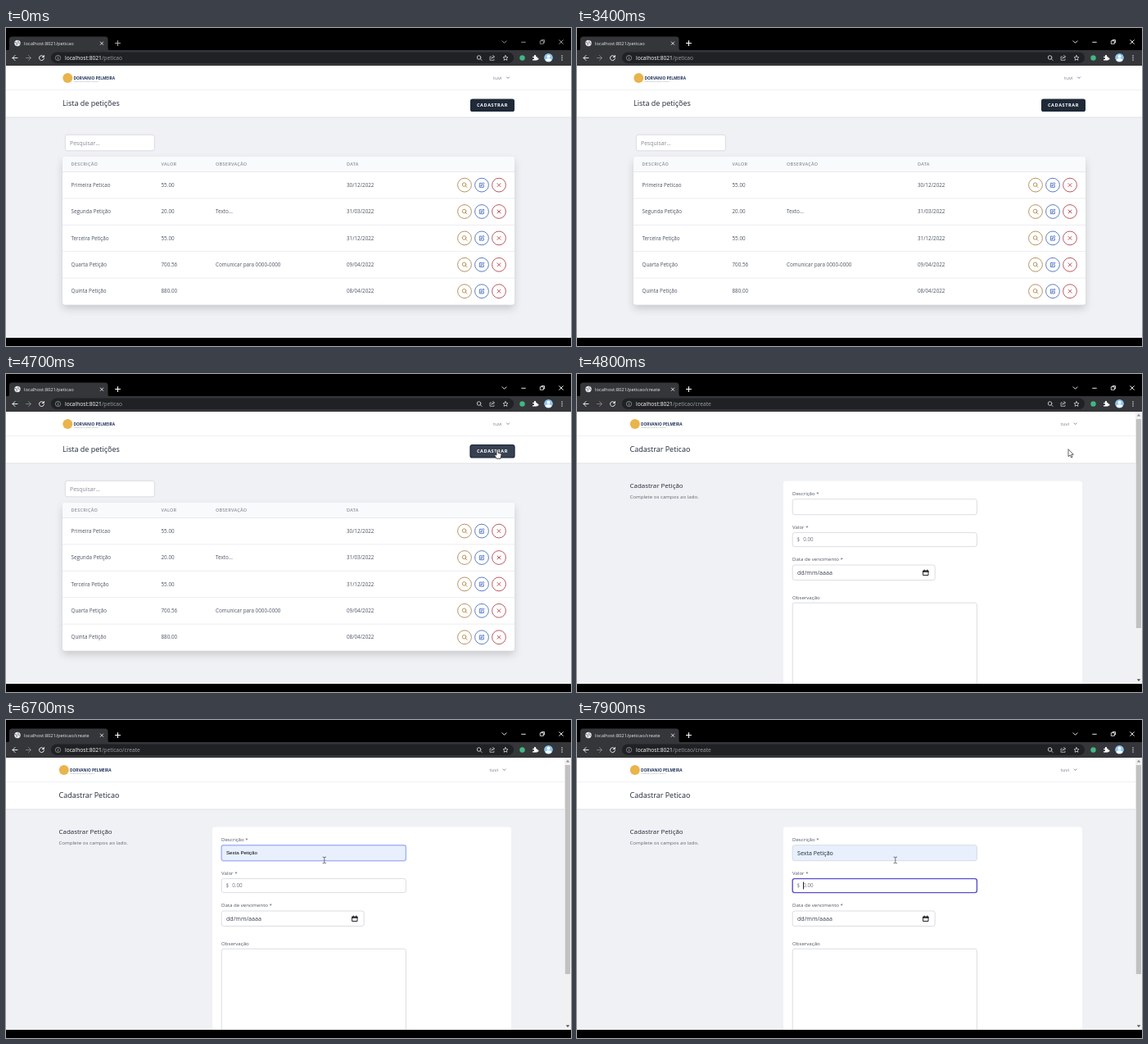
These frames come from a looping animation (690 px wide and 388 px high, 8 s). An HTML page:

```html
<!DOCTYPE html>
<html lang="pt">
<head>
<meta charset="utf-8">
<title>Lista de petições</title>
<style>
html, body { margin: 0; width: 100%; height: 100%; overflow: hidden; background: #000; }
svg { display: block; width: 100%; height: 100%; }
text { font-family: "Open Sans", "Noto Sans", sans-serif; white-space: pre; }
.icon { fill: none; stroke-linecap: round; stroke-linejoin: round; }
</style>
</head>
<body>
<svg id="stage" viewBox="0 0 690 388"></svg>
<script>
const LOOP = 8000, STEP = 100;
const stage = document.getElementById('stage');

// Text is placed by its left edge and the middle of its capitals.
const text = (x, y, size, fill, content, attrs = '') =>
  `<text x="${x}" y="${(y + size * 0.36).toFixed(2)}" font-size="${size}" fill="${fill}" ${attrs}>${content}</text>`;
const rect = (x, y, w, h, fill, attrs = '') =>
  `<rect x="${x}" y="${y}" width="${w}" height="${h}" fill="${fill}" ${attrs}/>`;
const circle = (x, y, r, fill, attrs = '') =>
  `<circle cx="${x}" cy="${y}" r="${r}" fill="${fill}" ${attrs}/>`;
const icon = (x, y, d, color, width = 0.9) =>
  `<path class="icon" transform="translate(${x} ${y})" d="${d}" stroke="${color}" stroke-width="${width}"/>`;
const field = (x, y, w, h, id = '') =>
  rect(x, y, w, h, '#fff', `rx="2.6" stroke="#d1d5db" stroke-width=".8" ${id && `id="${id}"`}`);

const CROSS = 'M-2-2L2 2M2-2L-2 2';
const PLUS = 'M-3 0H3M0-3V3';
const CHEVRON = 'M-2-1L0 1L2-1';
const LENS = 'M1.9-.5A2.3 2.3 0 1 1-2.7-.5A2.3 2.3 0 1 1 1.9-.5M1.3 1.2L3 2.9';
const PENCIL = 'M-.2-2.3H-2.7V2.7H2.3V.3M-1 1L-.7-.5L2-3.1L3-2.1L.4.6Z';

function browser() {
  const light = '#e8eaed', grey = '#9aa0a6';
  return rect(0, 0, 690, 388, '#000') +
    `<path d="M1 28Q4 28 4 24V14Q4 10.500 7.500 10.500H121Q124.500 10.500 124.500 14V24Q124.500 28 128 28Z" fill="#35363a"/>` +
    rect(0, 27, 690, 19, '#35363a') +
    circle(14, 18.5, 3.7, light) + icon(14, 18.5, 'M-2.6-1L-.5 0L-1 2.3M1-2.7L.7-1L2.6.5', '#5f6368', 0.8) +
    text(22, 18.8, 5.78, light, '', 'id="tabTitle"') +
    icon(117, 18.7, 'M-1.7-1.7L1.7 1.7M1.700-1.700L-1.700 1.700', light) +
    `<g id="controls">` + icon(136.5, 18.5, PLUS, '#fff', 1.1) +
      icon(608.5, 17, 'M-2.500-1.200L0 1.300L2.500-1.200', '#fff') + icon(632, 17.3, 'M-2.300 0H2.300', '#fff') +
      icon(655, 17, 'M-2.300-1.300H1.300V2.300H-2.300ZM-1-1.500V-2.500H2.500V1H1.500', '#fff', 0.8) +
      icon(678, 17, 'M-2.300-2.300L2.300 2.300M2.300-2.300L-2.300 2.300', '#fff') + `</g>` +
    icon(11, 36.5, 'M3 0H-3M0-3L-3 0L0 3', light, 1) +
    icon(27.500, 36.5, 'M-3 0H3M0-3L3 0L0 3', '#7b7e83', 1) +
    icon(43.500, 36.5, 'M2.300-1.900A3 3 0 1 0 3 .6M2.900-3V-1H.8', light, 1) +
    rect(55, 29.5, 565, 13.500, '#202124', 'rx="6.75"') +
    circle(63.5, 36.5, 3.1, 'none', `stroke="${grey}" stroke-width=".8"`) +
    icon(63.5, 36.5, 'M0-.2V1.600M0-1.500V-1.400', grey, 0.8) +
    text(72, 36.6, 6.66, '#fff', `localhost:8021<tspan id="path" fill="${grey}"></tspan>`) +
    icon(578, 36.5, LENS, '#d0d3d7') +
    icon(594, 36.5, 'M-1.500-1.500H-3V2.800H2V1.500M-1.300 1Q-1-1.300 1.500-1.500M.5-3L2.800-1.500L.5 0', '#bdc1c6', 0.8) +
    icon(610, 36.5, 'M0-3L.9-1L3-.8L1.400.6L1.900 2.800L0 1.700L-1.900 2.800L-1.400.6L-3-.8L-.9-1Z', '#d0d3d7', 0.8) +
    circle(630.5, 36.5, 3.2, '#41b883') +
    `<path transform="translate(646 36.500)" d="M-3-1.500H-1A1.300 1.300 0 1 1 1-1.500H2.500V.2A1.200 1.200 0 1 1 2.500 2V3H-3V1.500A1.200 1.200 0 1 0-3-.3Z" fill="#fff"/>` +
    circle(662.5, 36.3, 5.3, '#8fc7ee') + circle(662.5, 34.7, 1.9, '#fff') +
    `<path d="M658.700 39.500Q659 37 662.500 37T666.300 39.500Q662.500 42.500 658.700 39.500Z" fill="#fff"/>` +
    [-2.4, 0, 2.4].map(dy => circle(679, 36.5 + dy, 0.75, light)).join('');
}

function pageTop(left, title) {
  return rect(0, 46, 690, 332, '#f0f1f5') +
    rect(0, 108, 690, 1.5, '#dfe1e6') + rect(0, 46, 690, 62.500, '#fff') +
    rect(0, 75, 690, 0.8, '#eceef1') +
    circle(left + 6.3, 61, 6, '#e9b44c') +
    text(left + 13.5, 61, 4.75, '#1f3358', 'DORVANIO PELMEIRA', 'font-weight="700"') +
    text(left + 13.5, 65.4, 2.2, '#7d8797', 'ASSESSORIA JURÍDICA DIGITAL') +
    text(left + 526, 60.7, 6.1, '#7b818c', 'tuvi') +
    icon(left + 544, 60.7, 'M-1.500-.8L0 .8L1.500-.8', '#7b818c') +
    text(left, 92, 9, '#1f2937', title);
}

function listPage() {
  const columns = [79.5, 189.5, 256, 416];
  const rows = [
    ['Primeira Peticao', '55.00', '', '30/12/2022'],
    ['Segunda Petição', '20.00', 'Texto...', '31/03/2022'],
    ['Terceira Petição', '55.00', '', '31/12/2022'],
    ['Quarta Petição', '700.56', 'Comunicar para 0000-0000', '09/04/2022'],
    ['Quinta Petição', '880.00', '', '08/04/2022'],
  ];
  const actions = [[560, '#b28a4e', LENS], [581, '#4b70c4', PENCIL], [602, '#b5484f', CROSS]];
  const rowMarkup = rows.map((cells, i) => {
    const y = 191.6 + i * 32.4;
    return (i ? rect(69, y - 16.5, 552, 0.8, '#e7e9ed') : '') +
      cells.map((cell, c) => text(columns[c], y, 6.3, '#4b5563', cell)).join('') +
      actions.map(([x, color, d]) =>
        circle(x, y, 8.4, '#fff', `stroke="${color}" stroke-width=".9"`) + icon(x, y, d, color)).join('');
  }).join('');

  return pageTop(69, 'Lista de petições') +
    rect(567, 86.5, 54, 15.5, '#1f2937', 'id="button" rx="2.600"') +
    text(575, 94.1, 5.6, '#fff', 'CADASTRAR', 'font-weight="700" letter-spacing=".56"') +
    field(72.3, 130.3, 109, 19.5) + text(78, 140.3, 6.9, '#858b96', 'Pesquisar...') +
    rect(69, 157, 552, 180.6, '#fff', 'rx="3.600" filter="url(#cardShadow)"') +
    `<path d="M69 175.500V160.600Q69 157 72.600 157H617.400Q621 157 621 160.600V175.500Z" fill="#f9fafb"/>` +
    rect(69, 175.2, 552, 0.8, '#e5e7eb') +
    ['DESCRIÇÃO', 'VALOR', 'OBSERVAÇÃO', 'DATA'].map((name, c) =>
      text(columns[c], 166, 5.5, '#8a909b', name, 'font-weight="600" letter-spacing=".27"')).join('') +
    rowMarkup;
}

function createPage() {
  const label = (y, name) => text(263, y, 6.1, '#4b5563', name);
  return pageTop(64.5, 'Cadastrar Peticao') +
    text(64.5, 136.2, 7.95, '#1f2937', 'Cadastrar Petição') +
    text(64.5, 149.7, 6.15, '#5f6672', 'Complete os campos ao lado.') +
    rect(252, 130.5, 365, 260, '#fff', 'rx="3" filter="url(#softShadow)"') +
    label(146, 'Descrição *') + field(263.2, 152.7, 225.2, 19, 'description') +
    text(269, 162, 7.1, '#1f2937', '', 'id="typed"') +
    text(269, 162, 6.15, '#000', 'Sexta Petição', 'id="preview" style="font-family:\'Liberation Sans\',sans-serif"') +
    label(187, 'Valor *') + field(263.2, 193.6, 225.2, 17, 'amount') +
    text(268.5, 202, 6.2, '#6b7280', '$') + text(276.3, 202, 6.2, '#6b7280', '0.00') +
    label(226.2, 'Data de vencimento *') + field(263.2, 233, 174, 18.500) +
    text(269, 242.2, 7.1, '#374151', 'dd/mm/aaaa') +
    icon(426, 242.5, 'M-3-2.500H3V3H-3ZM-3-1.800H3M-3-1.200H3M-1.800-3.500V-2.500M1.800-3.500V-2.500', '#111', 0.9) +
    label(272.7, 'Observação') + field(263.2, 279.2, 225.2, 110) +
    rect(269, 157, 0.9, 10, '#111', 'id="caret"') +
    rect(682, 46, 8, 332, '#f1f1f1') + rect(682.8, 55, 6.2, 255, '#c1c1c1') +
    `<path d="M683.800 51.500L686 48.800L688.200 51.500Z" fill="#8b8b8b"/>` +
    `<path d="M683.800 372.300L686 375L688.200 372.300Z" fill="#555"/>` +
    rect(0, 378, 690, 10, '#000');
}

const cursors = `
  <path id="arrow" d="M0 0V9L2.100 7.200L3.500 10.300L5 9.600L3.600 6.600H6.300Z" fill="#fff" stroke="#222" stroke-width=".7"/>
  <path id="hand" d="M-1 .8Q0-.6 1 .8V4.500L4.300 5.300Q5.200 5.600 5 6.700L4 11.500H-1L-3.200 7.800Q-3.200 6.200-1 7.300Z" fill="#fff" stroke="#222" stroke-width=".8"/>
  <path id="beam" class="icon" d="M-1.800-3.800Q0-3.800 0-3Q0-3.800 1.800-3.800M0-3V3M-1.800 3.800Q0 3.800 0 3Q0 3.800 1.800 3.800" stroke="#555" stroke-width=".8"/>`;

stage.innerHTML = `
  <defs>
    <filter id="cardShadow" x="-10%" y="-10%" width="120%" height="130%">
      <feDropShadow dx="0" dy="5" stdDeviation="5" flood-opacity=".16"/>
    </filter>
    <filter id="softShadow"><feDropShadow dx="0" dy=".5" stdDeviation=".7" flood-opacity=".1"/></filter>
  </defs>
  ${browser()}
  <g id="list">${listPage()}</g>
  <g id="create">${createPage()}</g>
  ${rect(0, 378, 690, 10, '#000')}
  <g id="cursor">${cursors}</g>`;

const $ = id => document.getElementById(id);
const show = (id, visible) => { $(id).style.display = visible ? '' : 'none'; };
const set = (id, attrs) => { for (const name in attrs) $(id).setAttribute(name, attrs[name]); };

// Pointer stops: time, x, y.
const stops = [[3400, 602, 385], [3800, 633, 114], [3900, 633, 114], [4100, 600, 91.700],
  [4900, 600, 91.700], [5400, 388.800, 171]];

function pointerAt(t) {
  const next = stops.findIndex(stop => stop[0] > t);
  if (next < 0) return stops[stops.length - 1].slice(1);
  if (next === 0) return stops[0].slice(1);
  const [t0, x0, y0] = stops[next - 1], [t1, x1, y1] = stops[next];
  const p = (t - t0) / (t1 - t0), ease = p * p * (3 - 2 * p);
  return [x0 + (x1 - x0) * ease, y0 + (y1 - y0) * ease];
}

function render(t) {
  const creating = t >= 4800;
  const path = creating ? '/peticao/create' : '/peticao';
  $('tabTitle').textContent = 'localhost:8021' + path;
  $('path').textContent = path;
  set('controls', { opacity: t < 3400 ? 0.65 : 1 });
  show('list', !creating);
  show('create', creating);

  const hover = t >= 4100, pressed = t >= 4500;
  set('button', {
    fill: hover ? '#374151' : '#1f2937',
    stroke: pressed ? '#1b2333' : 'none',
    'stroke-width': pressed ? 1.2 : 0,
  });

  const inAmount = t >= 7900;
  const inDescription = t >= 5700 && !inAmount;
  const previewing = t >= 6700 && t < 7200;
  set('description', {
    fill: t >= 6700 ? '#e8f0fe' : '#fff',
    stroke: inDescription ? '#a9b5f3' : '#d1d5db',
    'stroke-width': inDescription ? 1.5 : 0.8,
  });
  set('amount', { stroke: inAmount ? '#5a50c8' : '#d1d5db', 'stroke-width': inAmount ? 1.4 : 0.8 });

  $('typed').textContent = t >= 7200 ? 'Sexta Petição' : previewing || t < 6200 ? '' : t < 6400 ? 'S' : 'Se';
  show('preview', previewing);
  show('caret', inAmount || inDescription && !previewing && t < 7700);
  if (creating) {
    const typedWidth = $('typed').textContent ? $('typed').getComputedTextLength() : 0;
    set('caret', inAmount ? { x: 276, y: 197.5, height: 9 } : { x: 269 + typedWidth, y: 157, height: 10 });
  }

  const [x, y] = pointerAt(t);
  set('cursor', { transform: `translate(${x} ${y})` });
  show('cursor', t >= 3500);
  show('hand', hover && !creating);
  show('beam', t >= 5400);
  show('arrow', !hover || creating && t < 5400);
}

function tick() {
  const t = performance.now() % LOOP;
  render(Math.floor(t / STEP) * STEP);
  requestAnimationFrame(tick);
}
tick();
</script>
</body>
</html>
```
